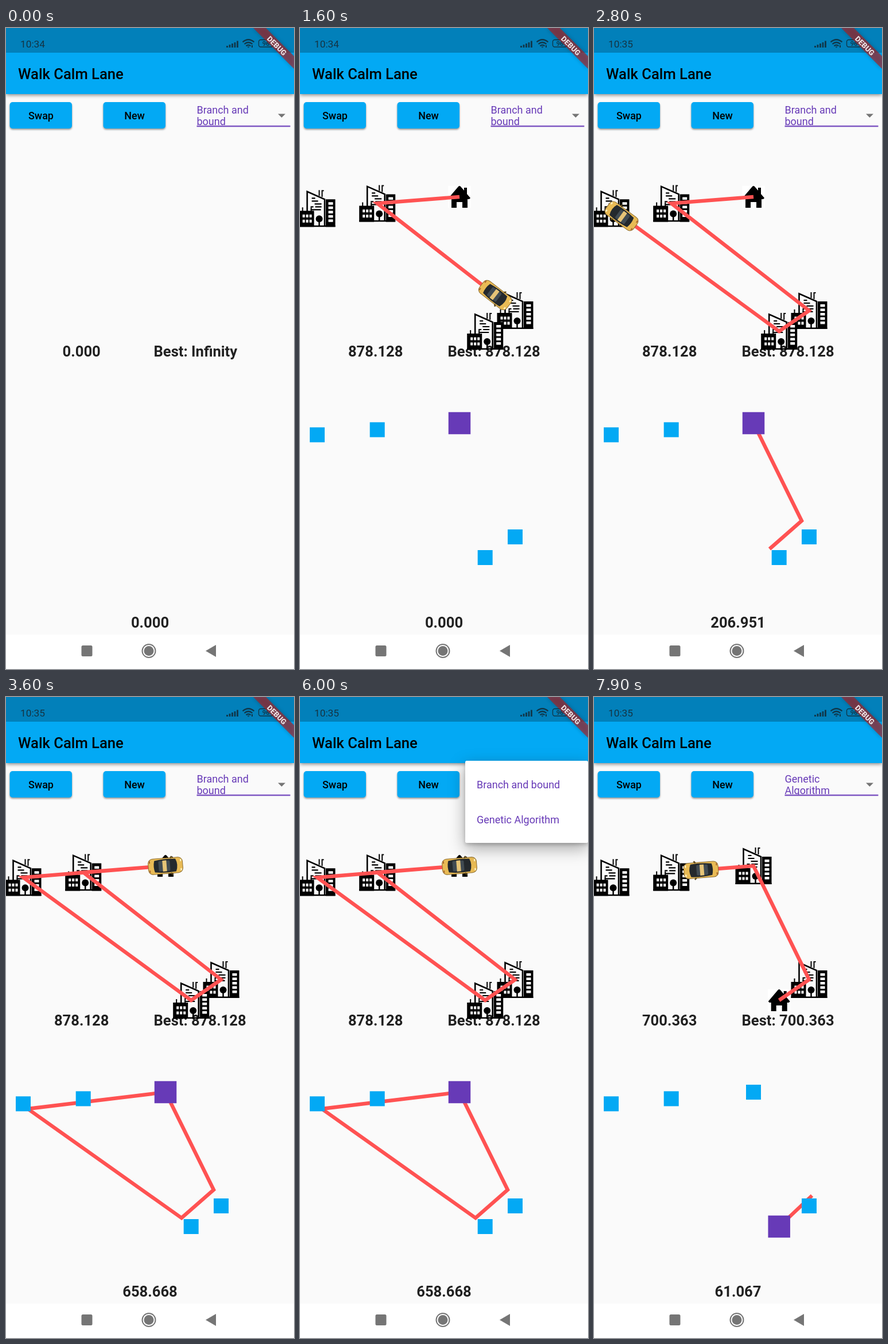
Write an HTML page that moves like this. It is 502 by 1116 pixels and loops after 8 s.

```html
<!DOCTYPE html>
<html lang="en">
<head>
<meta charset="utf-8">
<title>Walk Calm Lane</title>
<style>
  html, body { margin: 0; width: 100%; height: 100%; overflow: hidden; background: #fafafa; }
  svg { display: block; width: 100vw; height: 100vh; font-family: Roboto, sans-serif; }
  .button rect { fill: #03a9f4; filter: drop-shadow(0 2px 1.5px #0006); }
  .button text { font-size: 17.9px; font-weight: 500; text-anchor: middle; }
  .label { font-size: 25.6px; font-weight: 700; fill: #212121; }
  .middle { text-anchor: middle; }
  .option { font-size: 18px; fill: #673ab7; }
  .route { fill: none; stroke: #ff5252; stroke-width: 6.4; }
</style>
</head>
<body>
<svg viewBox="0 0 502 1116">
  <defs>
    <clipPath id="fieldClip"><rect x="330" y="125" width="140" height="45.5"/></clipPath>
    <g id="city" transform="translate(-31.5 -32)">
      <path d="M14 38V2.5L44.5 16V62" fill="none" stroke="#000" stroke-width="2.6"/>
      <path d="M35 0V10M43 1H40V12M6 30V37M21 30V37" fill="none" stroke="#000" stroke-width="2"/>
      <path d="M22 14h6M22 19h11M27 24h12M20 29h5M28 29h11M20 34h18" stroke="#000" stroke-width="2.2"/>
      <path d="M0 36H26V64H0ZM46.500 16H63V64H46.500Z"/>
      <path d="M6 45H22M6 54H22" stroke="#fff" stroke-width="5" stroke-dasharray="4 2"/>
      <path d="M55 21V57" stroke="#fff" stroke-width="8" stroke-dasharray="4.500 3"/>
      <circle cx="35" cy="50" r="6"/>
      <path d="M35 50V62M0 62.700H63" stroke="#000" stroke-width="2.500"/>
    </g>
    <g id="home">
      <rect x="-19.500" y="-19.500" width="39" height="39" fill="#fff"/>
      <path d="M-19 2L-2-18Q0-20 2-18L8-11V-16H13V-5L19 2L17 4H14V19H5V9H-5V19H-14V4H-17Z"/>
    </g>
    <g id="taxi">
      <rect x="-30" y="-13.500" width="60" height="27" rx="8" fill="#e9bb55" stroke="#8d6d30"/>
      <path d="M9-13l3-3M9 13l3 3" stroke="#5b481f" stroke-width="2.500"/>
      <path d="M-19-10Q0-13 18-11Q23 0 18 11Q0 13-19 10Q-22 0-19-10Z" fill="#24292d"/>
      <rect x="-12" y="-9" width="20" height="18" rx="2" fill="#414b52"/>
      <rect x="-5" y="-9.500" width="7" height="19" fill="#e6c477"/>
      <path d="M27-10v4M27 6v4" stroke="#fff0bd" stroke-width="2.500"/>
      <path d="M-27.500-10v4M-27.500 6v4" stroke="#a8642f" stroke-width="2"/>
    </g>
  </defs>

  <rect width="502" height="1116" fill="#fafafa"/>
  <rect width="502" height="115" fill="#03a9f4" style="filter:drop-shadow(0 2px 3px #0007)"/>
  <rect width="502" height="43" fill="#0280ba"/>
  <text id="clock" x="25" y="34" font-size="17.300" fill="#143444"></text>
  <g fill="none" stroke="#10374a">
    <path d="M385.500 34v-3M390 34v-5M394.500 34v-7M399 34v-9M403.500 34v-11.500" stroke-width="2.800"/>
    <path d="M412.500 24.500q10-8.500 20 0M415.500 28q7-6 14 0M418.500 31.300q4-3.500 8 0" stroke-width="2.200"/>
    <circle cx="422.500" cy="33" r="1"/>
    <path d="M429 30v4" stroke-width="2"/>
    <rect x="440.500" y="20.500" width="25" height="12.500" rx="3.500" stroke-width="1.400"/>
  </g>
  <text x="453" y="31" class="middle" font-size="11" font-weight="500" fill="#10374a">96</text>
  <text x="21" y="89" font-size="25.600" font-weight="500">Walk Calm Lane</text>

  <g class="button"><rect x="6.500" y="129" width="108.500" height="46" rx="5"/><text x="61" y="159">Swap</text></g>
  <g class="button"><rect x="169.500" y="129" width="108.500" height="46" rx="5"/><text x="224" y="159">New</text></g>
  <g class="option" clip-path="url(#fieldClip)">
    <text id="choiceTop" x="332.500" y="148.500"></text>
    <text id="choiceEnd" x="332.500" y="168.500"></text>
  </g>
  <path d="M332.500 171H495.500" stroke="#7e57c2" stroke-width="2.600"/>
  <path d="M474 149.500h13l-6.500 6.500z" fill="#757575"/>

  <text id="length" class="label middle" x="131.700" y="571.500"></text>
  <text id="best" class="label" x="257.500" y="571.500"></text>
  <g id="map"></g>
  <polyline id="trail" class="route"/>
  <use id="car" href="#taxi"/>
  <polyline id="drawn" class="route"/>
  <g id="squares"></g>
  <text id="score" class="label middle" x="251" y="1043.500"></text>

  <rect y="1056" width="502" height="60" fill="#fff"/>
  <g fill="#757575">
    <rect x="131.500" y="1075" width="19" height="19" rx="2.500"/>
    <circle cx="249" cy="1084.500" r="8.500"/>
    <circle cx="249" cy="1084.500" r="11.500" fill="none" stroke="#757575" stroke-width="2"/>
    <path d="M348 1084.500l18-10.500v21z"/>
  </g>

  <g id="menu">
    <rect x="288" y="111" width="214" height="143" rx="2.500" fill="#fff"
      style="filter:drop-shadow(0 3px 3px #0003) drop-shadow(0 9px 14px #0005)"/>
    <text class="option" x="308" y="158.500">Branch and bound</text>
    <text class="option" x="308" y="220">Genetic Algorithm</text>
  </g>
  <path d="M431 0H453L502 49V71Z" fill="#b71c1c" fill-opacity=".63" style="filter:drop-shadow(0 0 3px #0006)"/>
  <text class="middle" transform="translate(472 31) rotate(45)" y="4.500" font-size="13" font-weight="900" fill="#eadfe1">DEBUG</text>
</svg>

<script>
const LOOP = 8000, STEP = 100, TRIP = 3010, LOWER = 394;
const places = [[30, 314.3], [134.7, 305.4], [278, 294], [375, 492], [322.7, 528]];
const $ = id => document.getElementById(id);

const runs = [
  { show: 700, depart: 517, order: [2, 1, 3, 4, 0, 2], length: '878.128',
    taps: [[2000, 362, 858], [2500, 306, 907], [3000, 38, 717], [3300, 278, 688]] },
  { show: 6600, depart: 6637, order: [4, 3, 2, 1, 0, 4], length: '700.363',
    taps: [[7700, 380, 868]] }
];
const scores = [[0, '0.000'], [2000, '148.137'], [2500, '206.951'],
                [3000, '465.602'], [3300, '658.668'], [7700, '61.067']];

const setText = (id, value) => { if ($(id).textContent !== value) $(id).textContent = value; };
const latest = (list, time) => list.filter(([start]) => start <= time).pop();

// Walks a share of the route at constant speed.
function travel(route, share) {
  const legs = route.slice(1).map((p, i) => Math.hypot(p[0] - route[i][0], p[1] - route[i][1]));
  let left = share * legs.reduce((a, b) => a + b);
  let i = 0;
  while (i < legs.length - 1 && left > legs[i]) left -= legs[i++];
  const [x, y] = route[i], dx = route[i + 1][0] - x, dy = route[i + 1][1] - y;
  const part = Math.min(1, left / legs[i]);
  const tip = [x + dx * part, y + dy * part];
  return { tip, angle: Math.atan2(dy, dx) * 180 / Math.PI, trail: [...route.slice(0, i + 1), tip] };
}

function buildMap(home) {
  const icon = (i, kind) => `<use href="#${kind}" x="${places[i][0]}" y="${places[i][1]}"/>`;
  $('map').innerHTML = places.map((_, i) => icon(i, i === home ? 'home' : 'city')).join('');
  $('squares').innerHTML = places.map(([x, y], i) => {
    const size = i === home ? 38.5 : 26;
    return `<rect x="${x - size / 2}" y="${y + LOWER - size / 2}" width="${size}" height="${size}"
      fill="${i === home ? '#673ab7' : '#03a9f4'}"/>`;
  }).join('');
}

let current;
function render(time) {
  const run = runs.filter(r => r.show <= time).pop() || null;
  if (run !== current) {
    current = run;
    if (run) buildMap(run.order[0]);
    else $('map').innerHTML = $('squares').innerHTML = '';
  }
  const genetic = time >= 6600;
  setText('clock', time < 2400 ? '10:34' : '10:35');
  setText('choiceTop', genetic ? 'Genetic' : 'Branch and');
  setText('choiceEnd', genetic ? 'Algorithm' : 'bound');
  setText('length', run ? run.length : '0.000');
  setText('best', 'Best: ' + (run ? run.length : 'Infinity'));
  setText('score', latest(scores, time)[1]);
  $('menu').setAttribute('opacity', genetic ? 0 : Math.max(0, Math.min(1, (time - 4900) / 200)));

  for (const id of ['trail', 'car', 'drawn']) $(id).style.display = run ? '' : 'none';
  if (!run) return;
  const share = Math.max(0, Math.min(1, (time - run.depart) / TRIP));
  const { tip, angle, trail } = travel(run.order.map(i => places[i]), share);
  $('trail').setAttribute('points', trail.join(' '));
  $('car').setAttribute('transform', `translate(${tip}) rotate(${angle})`);
  const [x, y] = places[run.order[0]];
  const taps = run.taps.filter(([at]) => at <= time).map(([, px, py]) => [px, py]);
  $('drawn').setAttribute('points', [[x, y + LOWER], ...taps].join(' '));
}

const begin = performance.now();
function tick() {
  const time = (performance.now() - begin) % LOOP;
  render(Math.floor(time / STEP) * STEP);
  requestAnimationFrame(tick);
}
tick();
</script>
</body>
</html>
```
